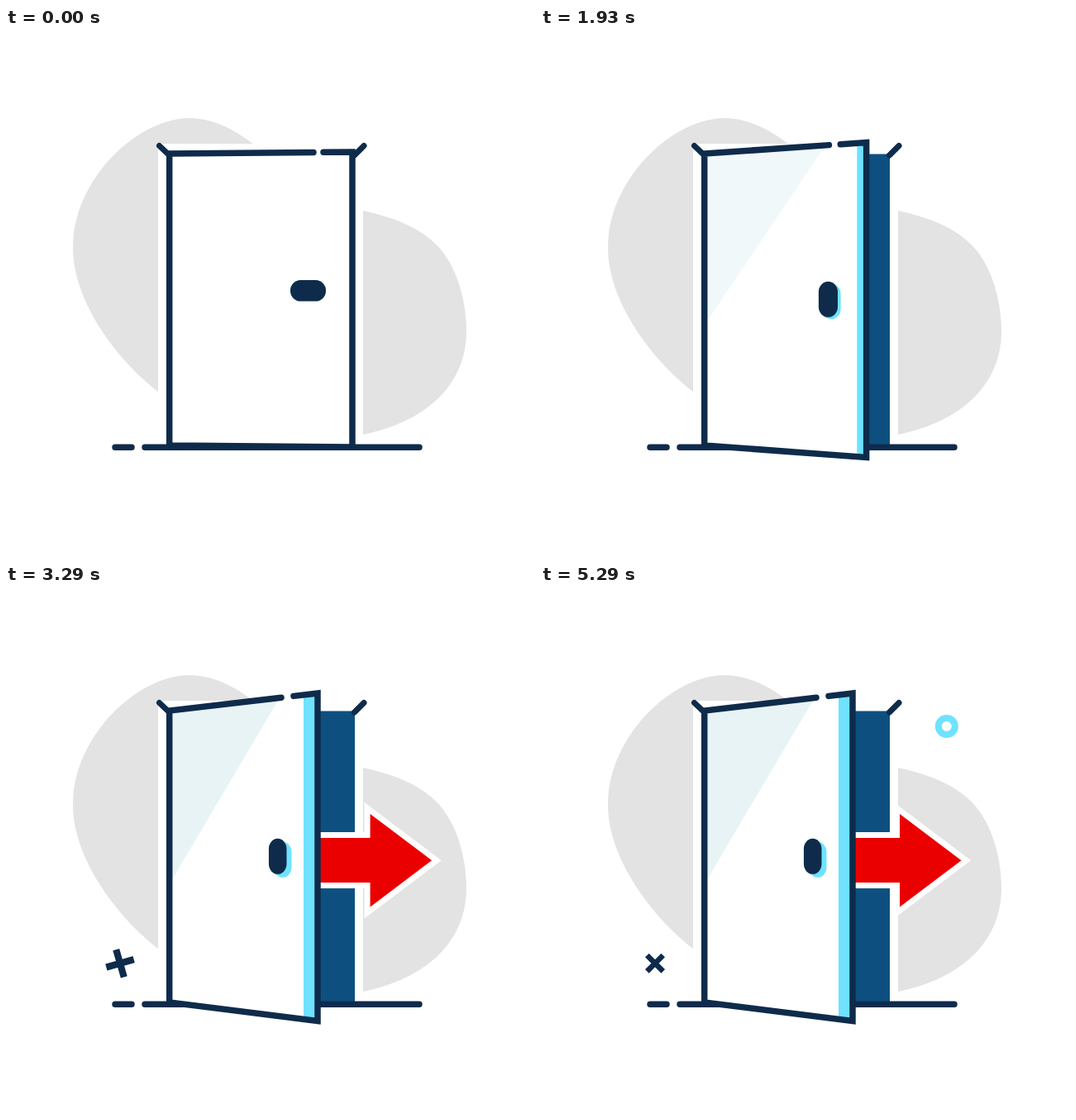
An HTML page that plays this animation: 640x640 px, repeating every 6070 ms.

```html
<!DOCTYPE html>
<html lang="en">
<head>
<meta charset="utf-8">
<title>Opening door</title>
<style>
  html, body { margin: 0; width: 100%; height: 100%; overflow: hidden; background: #fff; }
  svg { display: block; width: 100vw; height: 100vh; }
  .line { fill: none; stroke: #0f2b4b; stroke-width: 7.5; stroke-linecap: round; }
</style>
</head>
<body>
<svg viewBox="0 0 640 640">
  <defs><rect id="pill" x="-32" y="-12.75" width="43" height="25.5" rx="12.5"/></defs>
  <g fill="#e3e3e3">
    <path d="M184 440C130 398 81 328 81 266C81 182 160 109 222 109C250 109 275 122 299 140H184Z"/>
    <path d="M432 221C470 229 505 243 526 268C547 293 557 333 557 367C557 430 510 476 432 492Z"/>
  </g>
  <path fill="#0d5080" d="M300 152.5H422V507H300Z"/>
  <path id="arrow" fill="#eb0000" stroke="#fff" stroke-width="14" paint-order="stroke"/>
  <path class="line" stroke-width="7" d="M132 507.3H152M168 507.3H500"/>
  <path id="panel" fill="#fff"/>
  <path id="glass" fill="#e8f3f6"/>
  <path id="side" fill="#6ee2ff"/>
  <use id="shade" href="#pill" fill="#6ee2ff"/>
  <use id="handle" href="#pill" fill="#0f2b4b"/>
  <path id="frame" class="line"/>
  <path class="line" style="stroke-width:7" d="M185.5 142.5L195.5 152M433 142.5L421.5 154"/>
  <path id="cross" fill="none" stroke="#0f2b4b" stroke-width="6.5" d="M-9.7 -9.7L9.7 9.7M-9.7 9.7L9.7 -9.7"/>
  <circle id="ring" r="10" fill="#fff" stroke="#6ee2ff" stroke-width="8"/>
</svg>
<script>
const LOOP = 6070, FPS = 0.014; // frames per millisecond
const HINGE = 197.7, TOP = 152, BOTTOM = 505;
const set = (id, attrs) => {
  const el = document.getElementById(id);
  for (const name in attrs) el.setAttribute(name, attrs[name]);
};

const curve = (a, b, s) => 3 * (1 - s) ** 2 * s * a + 3 * (1 - s) * s * s * b + s ** 3;

// Cubic bezier easing over a start and a duration
function ease(t, start, length, x1, y1, x2, y2) {
  const x = (t - start) / length;
  if (x <= 0) return 0;
  if (x >= 1) return 1;
  let lo = 0, hi = 1;
  for (let i = 0; i < 30; i++) {
    const mid = (lo + hi) / 2;
    if (curve(x1, x2, mid) < x) lo = mid; else hi = mid;
  }
  return curve(y1, y2, lo);
}

const pop = (t, start) => ease(t, start, 1480, 0.3, 0, 0, 2);

function drawDoor(open, turn) {
  const x = 419 - 42 * open, top = 150 - 19 * open, bottom = 507 + 20.5 * open;
  const along = (from, to) => px => from + (to - from) * (px - HINGE) / (x - HINGE);
  const topAt = along(TOP, top), bottomAt = along(BOTTOM, bottom);
  const onTop = px => `${px} ${topAt(px)}`;
  const gapLeft = 372 - 39 * open, gapRight = 384 - 36 * open;
  const inner = x - 2.7 - 14.3 * open;

  set("panel", { d: `M${HINGE} ${TOP}L${x} ${top}V${bottom}L${HINGE} ${BOTTOM}Z` });
  set("frame", { d: `M${onTop(gapRight)}L${x} ${top}V${bottom}L${HINGE} ${BOTTOM}V${TOP}L${onTop(gapLeft)}` });
  set("side", { d: `M${onTop(inner)}L${x} ${top}V${bottom}L${inner} ${bottomAt(inner)}Z` });
  set("glass", { d: `M${HINGE} ${TOP}L${onTop(364 - 33 * open)}L${HINGE} ${356 + 6 * open}Z`, opacity: open });

  const place = (dx, dy) =>
    `translate(${376 - 47.3 * open + dx} ${317.8 + dy}) scale(${1 - 0.155 * open} 1) rotate(${-90 * turn})`;
  set("handle", { transform: place(0, 0) });
  set("shade", { transform: place(6 * open, 4 * open) });
}

function draw(t) {
  drawDoor(ease(t, 1217, 1800, 0.4, 0, 0.2, 1), ease(t, 178, 1558, 0.68, -0.55, 0.25, 1));

  const shift = 200 * (ease(t, 1360, 2430, 0.4, 0, 0.1, 1.25) - 1);
  const neck = 434 + shift;
  set("arrow", { d: `M280 306H${neck}V277L${neck + 74.5} 333.2L${neck} 389.4V360H280Z` });

  const cross = pop(t, 2604), ring = pop(t, 3400);
  set("cross", { transform: `translate(138 457.7) rotate(${110 * (cross - 1)}) scale(${cross})` });
  set("ring", { transform: `translate(490.8 171) scale(${ring})` });
}

function tick() {
  const t = performance.now() % LOOP;
  draw(Math.floor((t + 5) * FPS) / FPS);
  requestAnimationFrame(tick);
}
tick();
</script>
</body>
</html>
```
